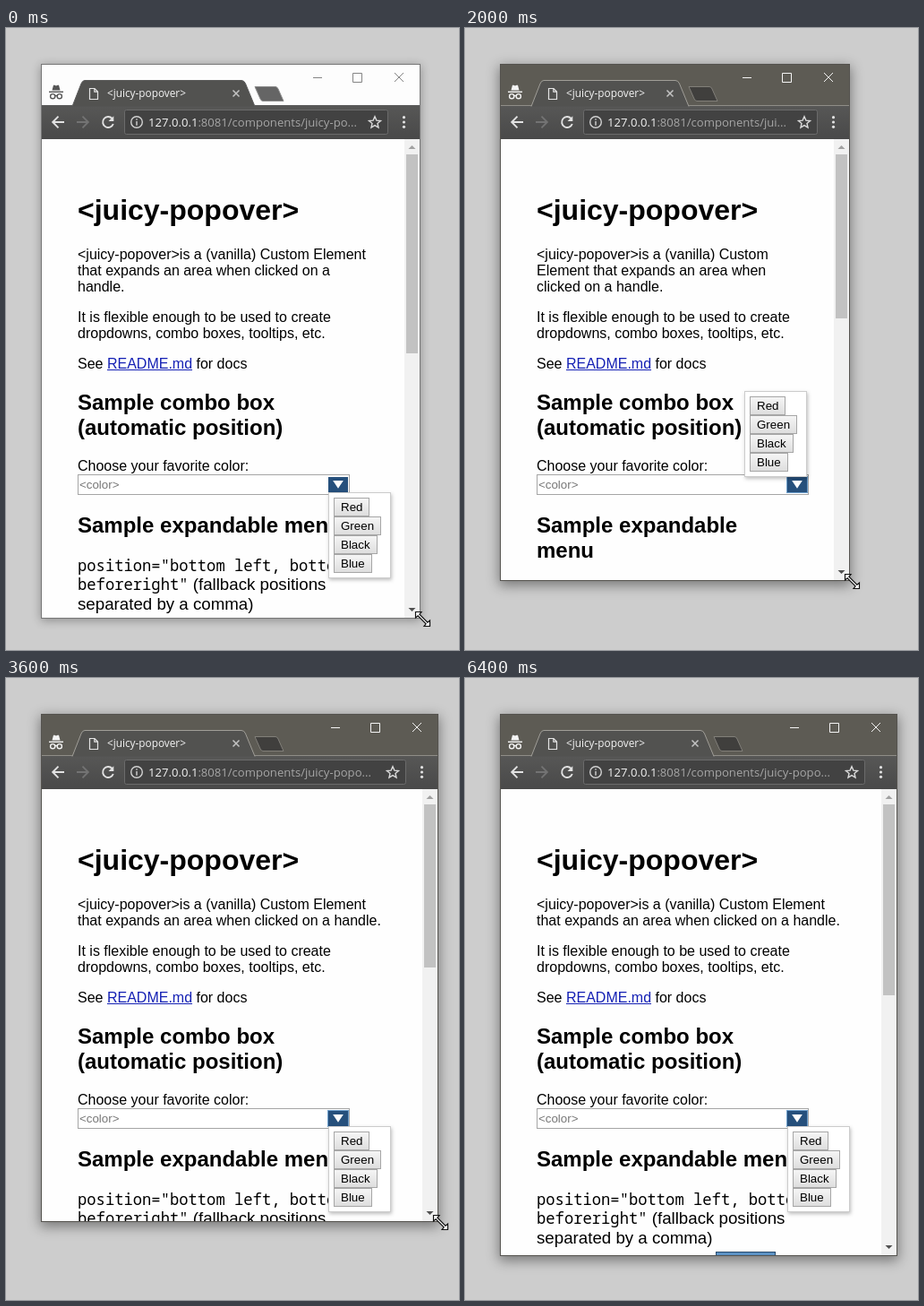
Write an HTML page that moves like this. It is 506 px wide and 694 px high and loops after 6800 ms.

```html
<!DOCTYPE html>
<html lang="en">
<head>
<meta charset="utf-8">
<title>Popover demo</title>
<style>
html, body { margin: 0; width: 100%; height: 100%; overflow: hidden; background: #cdcdcd; }
#stage { position: relative; width: 506px; height: 694px; overflow: hidden; background: #cdcdcd; }
#stage > svg { position: absolute; left: 0; top: 0; }
#win { position: absolute; left: 39px; top: 40px; background: #fefefe; }
#view { position: absolute; left: 40px; top: 124px; overflow: hidden; background: #fefefe; }
#page { position: relative; padding: 40px 39px 0 40px; color: #000;
  font: 16px/18px "Liberation Sans", Arial, sans-serif; }
h1 { font-size: 32px; line-height: 37px; margin: 21.44px 0; }
h2 { font-size: 24px; line-height: 28px; margin: 19.92px 0; }
h3 { font-size: 18.72px; line-height: 21.5px; font-weight: normal; margin: 18.72px 0; }
h3 code { font: 17.16px/21px "Noto Sans Mono", monospace; }
p { margin: 16px 0; }
u { color: #1420b4; }
#combo { position: relative; box-sizing: border-box; width: 304px; height: 23px; border: 1px solid #a5a5a5;
  font-size: 13.33px; line-height: 21px; padding-left: 1px; color: #777; background: #fff; }
#handle { position: absolute; left: 279px; top: 2px; width: 22px; height: 17px; background: #26507c; }
#handle::after { content: ""; position: absolute; left: 5px; top: 4px; width: 12px; height: 9px;
  background: #fff; clip-path: polygon(0 0, 100% 0, 50% 100%); }
#pop { position: absolute; box-sizing: border-box; width: 70px; height: 96px; padding: 5px;
  border: 1px solid #ccc; background: #fff; box-shadow: 1px 2px 4px rgba(0,0,0,.25); }
#pop span { display: table; box-sizing: border-box; height: 21px; padding: 0 7px; border: 1px solid #a6a6a6;
  font-size: 13.33px; line-height: 19px; background: linear-gradient(#f5f5f5, #dedede); }
#next { position: absolute; left: 240px; box-sizing: border-box; width: 67px; height: 23px;
  border: 1px solid #27486b; background: #5c92c4; }
svg text { font-family: "Open Sans", "Noto Sans", sans-serif; }
</style>
</head>
<body>
<div id="stage">
  <div id="win"></div>
  <svg width="506" height="694" viewBox="0 0 506 694">
    <defs>
      <linearGradient id="bar" x2="0" y2="1">
        <stop offset="0" stop-color="#575756"/><stop offset="1" stop-color="#494949"/>
      </linearGradient>
    </defs>
    <rect id="title" x="40" y="41" height="46"/>
    <rect id="tools" x="40" y="87" height="37" fill="url(#bar)"/>
    <path id="rule" fill="none"/>
    <path id="tab" fill="#525250"/>
    <path id="plus" stroke-width="1"/>
    <g id="spy" fill="none" stroke-width="1.4">
      <path d="M48 71.3H64"/>
      <path d="M51.5 69.5L53 63.8H54.4L56 64.6 57.6 63.8H59L60.5 69.5Z" stroke="none" id="hat"/>
      <circle cx="52.2" cy="76.2" r="2.6"/><circle cx="59.8" cy="76.2" r="2.6"/>
      <path d="M54.8 75.8Q56 75 57.2 75.8"/>
    </g>
    <path d="M93.5 67.5H99L102.5 71V79.5H93.5ZM98.8 67.5V71.2H102.5" fill="none" stroke="#e4e4e4" stroke-width="1.2"/>
    <text x="113" y="77.3" font-size="11.8" fill="#f4f4f4">&lt;juicy-popover&gt;</text>
    <path id="shut" d="M-3.5 69.5L3.5 76.5M3.5 69.5L-3.5 76.5" stroke="#c4c4c4" stroke-width="1.5"/>
    <g fill="none" stroke="#e2e2e2" stroke-width="1.9">
      <path d="M65 105H52.5M58.5 98.7L52.2 105 58.5 111.3"/>
      <path d="M79 105H91.5M85.5 98.7L91.8 105 85.5 111.3" stroke="#737373"/>
      <path d="M118.6 101A6 6 0 1 0 119.8 107"/>
      <path d="M120.3 98.2V104H114.5Z" fill="#e2e2e2" stroke="none"/>
    </g>
    <rect id="field" x="132.5" y="91.5" height="27" rx="2" fill="#424242" stroke="#6b6b6b"/>
    <g stroke="#d2d2d2" stroke-width="1.4" fill="none">
      <circle cx="146" cy="105" r="6.3"/><path d="M146 104V108.7M146 101.2V102.7"/>
    </g>
    <text x="159" y="109.7" font-size="13.1" fill="#f2f2f2">127.0.0.1<tspan id="url" fill="#a6a6a6"></tspan></text>
    <g id="right">
      <path d="M-50 98.8L-48.1 103.1 -43.5 103.5 -47 106.5 -46 111 -50 108.6 -54 111 -53 106.5 -56.5 103.5 -51.9 103.1Z"
        fill="none" stroke="#dcdcdc" stroke-width="1.4"/>
      <g fill="#e2e2e2"><circle cx="-17.5" cy="99.7" r="1.6"/><circle cx="-17.5" cy="105" r="1.6"/><circle cx="-17.5" cy="110.3" r="1.6"/></g>
      <path id="ctrl" d="M-119 55.5H-109M-74.5 50.5H-64.5V60.5H-74.5ZM-28 50L-18 60M-18 50L-28 60" fill="none"/>
    </g>
    <g id="scroll">
      <rect id="track" y="124" width="17" fill="#f1f1f1"/>
      <rect id="thumb" x="2" y="141" width="13" fill="#c2c2c2"/>
      <path d="M4.5 135L8.5 131 12.5 135Z" fill="#a0a0a0"/>
      <path id="down" d="M4.5 -2L8.5 2 12.5 -2Z" fill="#505050"/>
    </g>
  </svg>
  <div id="view"><div id="page">
    <h1>&lt;juicy-popover&gt;</h1>
    <p>&lt;juicy-popover&gt;is a (vanilla) Custom Element that expands an area when clicked on a handle.</p>
    <p>It is flexible enough to be used to create dropdowns, combo boxes, tooltips, etc.</p>
    <p>See <u>README.md</u> for docs</p>
    <h2>Sample combo box (automatic position)</h2>
    <div>Choose your favorite color:</div>
    <div id="combo">&lt;color&gt;<div id="handle"></div></div>
    <h2>Sample expandable menu</h2>
    <h3 id="note"><code>position="bottom left, bottom beforeright"</code> (fallback positions separated by a comma)</h3>
    <div id="next"></div>
    <div id="pop"><span>Red</span><span>Green</span><span>Black</span><span>Blue</span></div>
  </div></div>
  <svg width="506" height="694" viewBox="0 0 506 694">
    <rect id="edge" x="39.5" y="40.5" fill="none"/>
    <path id="cursor" d="M-8 -8H-1.5L-3.6 -5.4 5.4 3.6 8 1.5V8H1.5L3.6 5.4 -5.4 -3.6 -8 -1.5Z"
      fill="#fff" stroke="#111" stroke-width="1.2"/>
  </svg>
</div>
<script>
const LOOP = 6800, STEP = 200;
const $ = id => document.getElementById(id);
const set = (id, attrs) => { for (const k in attrs) $(id).setAttribute(k, attrs[k]); };
const css = (id, styles) => { for (const k in styles) $(id).style[k] = styles[k]; };
const px = n => n + "px";

// time, right edge, bottom edge, lag of the page behind the window
const drag = [
  [0, 462, 658, 0], [200, 462, 658, 0], [1000, 430, 658, 0], [1400, 430, 658, 0],
  [2000, 429, 616, 0], [2400, 430, 594, 0], [2800, 453, 592, 4], [3200, 476, 589, 0],
  [3600, 482, 606, 0], [4000, 482, 632, 0], [4400, 482, 644, 0]
];

function sample(t) {
  const i = drag.findIndex(k => k[0] > t);
  if (i < 0) return drag[drag.length - 1].slice(1);
  const a = drag[i - 1], b = drag[i], f = (t - a[0]) / (b[0] - a[0]);
  return a.slice(1).map((v, j) => Math.round(v + (b[j + 1] - v) * f));
}

function drawFrame(active, R, B) {
  const x = Math.min(257, R - 200);
  css("win", {
    width: px(R - 38), height: px(B - 39),
    boxShadow: active ? "0 4px 13px 1px rgba(0,0,0,.42)" : "0 2px 10px rgba(0,0,0,.32)"
  });
  set("edge", { width: R - 39, height: B - 40, stroke: active ? "#55534f" : "#777" });
  set("title", { width: R - 40, fill: active ? "#5d5b54" : "#fdfdfd" });
  set("tools", { width: R - 40 });
  set("tab", {
    d: `M74 87.5L84 62Q85.5 58.5 88 58.5H${x + 6}Q${x + 9} 58.5 ${x + 10.5} 62L${x + 21} 87.5`,
    stroke: active ? "#a09e98" : "#5a5a5a"
  });
  set("rule", { d: `M40 86.5H74M${x + 21} 86.5H${R}`, stroke: active ? "#8f8d87" : "#5a5a5a" });
  set("plus", {
    d: `M${x + 21} 65.5H${x + 44}Q${x + 46} 65.5 ${x + 47} 68L${x + 53} 81.5H${x + 30}Q${x + 28} 81.5 ${x + 27} 79Z`,
    fill: active ? "#403f3d" : "#656565", stroke: active ? "#817f79" : "#8c8c8c"
  });
  set("spy", { stroke: active ? "#f4f4f4" : "#555" });
  set("hat", { fill: active ? "#f4f4f4" : "#555" });
  set("shut", { transform: `translate(${x} 0)` });
  set("field", { width: R - 36 - 132 });
  set("right", { transform: `translate(${R} 0)` });
  set("ctrl", { stroke: active ? "#f4f4f4" : "#858585" });
  const n = Math.floor(3.5 + (R - 430) / 7.1);
  $("url").textContent = ":8081/components/" + "juicy-popover".slice(0, n) + "...";
}

function drawPage(active, R, B, lag) {
  const edge = R - 17 - lag, h = B - 124;
  css("view", { width: px(edge - 40), height: px(h) });
  css("handle", { boxShadow: active ? "0 0 0 1px #6fa0cc" : "none" });

  const top = $("combo").offsetTop, fitsRight = edge > 430, fitsBelow = top + 124 + 116 <= B - 6;
  css("pop", { left: px(fitsRight ? 320 : 272), top: px(fitsBelow ? top + 20 : top - 93) });

  const end = $("note").offsetTop + $("note").offsetHeight;
  css("next", { top: px(end + 4) });
  set("scroll", { transform: `translate(${edge} 0)` });
  set("track", { height: h });
  set("thumb", { height: Math.round((h - 34) * h / (end + 673)) });
  set("down", { transform: `translate(0 ${B - 9})` });
}

function draw(ms) {
  const t = Math.floor((ms % LOOP) / STEP) * STEP;
  const [R, B, lag] = sample(t), active = t >= 200;
  drawFrame(active, R, B);
  drawPage(active, R, B, lag);
  const away = t >= 5200 ? 10 : 0;
  set("cursor", {
    transform: `translate(${R + 3.5} ${B + 1.5 + away})`,
    visibility: t < 5400 ? "visible" : "hidden"
  });
}

const start = performance.now();
function tick() {
  draw(performance.now() - start);
  requestAnimationFrame(tick);
}
tick();
</script>
</body>
</html>
```
